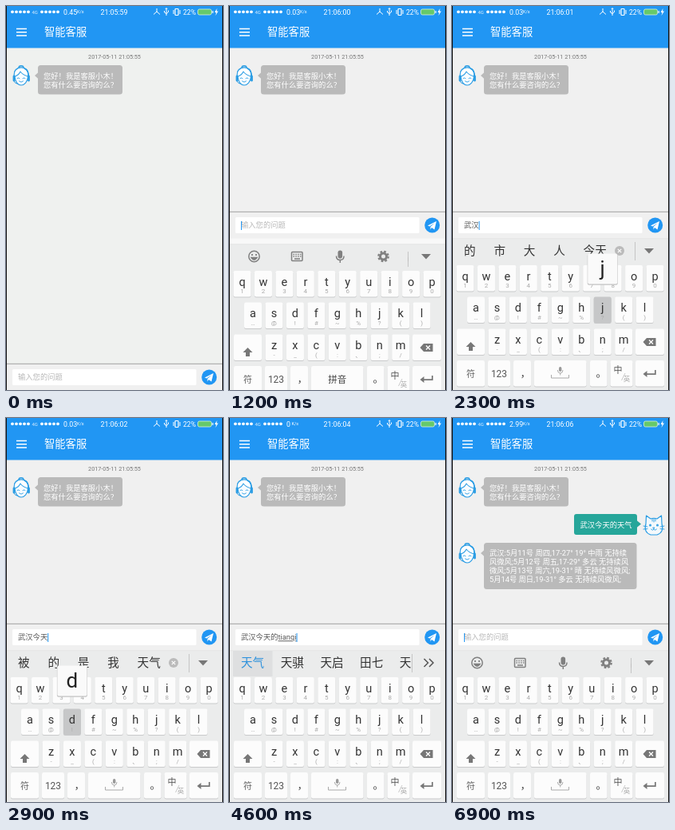
Write an HTML page that moves like this. It is 272x480 px and loops after 7 s.

```html
<!DOCTYPE html>
<html lang="zh">
<head>
<meta charset="utf-8">
<title>智能客服</title>
<style>
  html, body { margin: 0; width: 100%; height: 100%; overflow: hidden; background: #efefef; }
  svg { display: block; width: 100vw; height: 100vh; }
  text { font-family: Roboto, 'Noto Sans CJK SC', 'Noto Sans CJK', sans-serif; white-space: pre; }
  .msg { font-size: 9.3px; fill: #fff; }
  .line { fill: none; stroke: #2b9de4; stroke-linecap: round; stroke-linejoin: round; }
  .grey { fill: none; stroke: #808080; stroke-width: 1.5; }
  .mid { text-anchor: middle; }
</style>
</head>
<body>
<svg id="stage" viewBox="0 0 272 480">
  <defs>
    <g id="agent" class="line">
      <path d="M-8 0C-10-7-6-11 0-11S10-7 8.500 0C8 7 4 11 0 11S-7.500 7-8 0Z" fill="#f8fcff" stroke-width="1.100"/>
      <path d="M-8.500 0C-4-1-2-4-1-6C2-2 5-1 8.500 0C10-8 5-11 0-11S-10-7-8.500 0Z" fill="#fff" stroke-width="1.100"/>
      <path d="M-3-11C-3-14 3-14 3-11M4-10C9-8 10-3 9 4" stroke-width="1.500"/>
      <path d="M-5 2.500Q-3.500 1-2 2.500M2 2.500Q3.500 1 5 2.500M-2.500 6Q0 8.500 2.500 6" stroke-width=".9"/>
      <path d="M-9 0V5M9.500 0V5" stroke-width="2.800"/>
      <path d="M-9 6Q-8 9-4 9.500" stroke-width="1"/>
    </g>
    <g id="cat" class="line" stroke-width="1.200">
      <path d="M-10-2L-9.500-12L-4-8Q0-9.500 4-8L9.500-12L10-2Q13 9 4 12H-4Q-13 9-10-2Z" fill="#f4f9fc"/>
      <path d="M-2-8V-5M0-8.500V-4M2-8V-5M-13 1L-8 2M-13 5L-8 4.500M13 1L8 2M13 5L8 4.500" stroke-width=".9"/>
      <path d="M-3.500 5Q-1.500 7.500 0 5Q1.500 7.500 3.500 5M-1 3H1L0 4.500Z" stroke-width=".9"/>
      <circle cx="-4.500" cy="0" r=".9"/><circle cx="4.500" cy="0" r=".9"/>
    </g>
  </defs>

  <rect id="page" width="272" height="480"/>
  <rect width="272" height="52.500" fill="#2196f3"/>
  <g id="status" fill="#fff" font-size="8.800">
    <text x="32.500" y="9.500" font-size="6" opacity=".85">4G</text>
    <text id="speed" x="72" y="10.500"/>
    <text id="unit" y="9" font-size="5.500">K/s</text>
    <text id="clock" class="mid" x="135.500" y="10.500"/>
    <text x="222" y="10.500" font-size="8.600">22%</text>
    <path d="M189 3V7L185 10.500M189 7L193 10.500M201 3V12M198.500 6V8L201 9.500L203.500 7.500V5.500M199.800 4L201 2.500L202.200 4" fill="none" stroke="#fff"/>
    <rect x="212" y="3.500" width="4" height="8" rx=".7" fill="none" stroke="#fff" stroke-width="1.200"/>
    <path d="M210 5V10M218 5V10" stroke="#fff"/>
    <rect x="240.500" y="4" width="17" height="7" rx="2" fill="#66c96b" stroke="#d8f2d9" stroke-width=".8"/>
    <path d="M258.500 6H259.700V9H258.500ZM264.500 3L261.500 8H263.500L262.500 12L266 6.500H264Z"/>
  </g>
  <path d="M13 28.500H26M13 32.700H26M13 37H26" stroke="#fff" stroke-width="1.400"/>
  <text x="48" y="37.300" font-size="13.300" fill="#fff">智能客服</text>
  <text class="mid" x="136" y="65.700" font-size="7.200" fill="#777">2017-05-11 21:05:55</text>

  <use href="#agent" x="19" y="88"/>
  <path d="M36 87L41 82.500V91.500Z" fill="#bababa"/>
  <rect x="40" y="74" width="106" height="36.500" rx="3.500" fill="#bababa"/>
  <text class="msg" x="47" y="90.700">您好！我是客服小木！</text>
  <text class="msg" x="47" y="101.500">您有什么要咨询的么？</text>

  <g id="question">
    <path d="M237 132.500L231.500 128V137Z" fill="#26a69a"/>
    <rect x="153" y="120" width="79" height="26" rx="3" fill="#26a69a"/>
    <text class="msg" x="160.500" y="136.500">武汉今天的天气</text>
    <use href="#cat" x="253" y="134"/>
  </g>
  <g id="answer">
    <use href="#agent" x="19" y="170"/>
    <path d="M36 169L41 164.500V173.500Z" fill="#bababa"/>
    <rect x="40" y="156" width="191.500" height="58" rx="3.500" fill="#bababa"/>
  </g>

  <g id="bar">
    <rect x="0" y="257" width="272" height="34" fill="#f0f0f0"/>
    <path d="M0 257.300H272" stroke="#999" stroke-width=".9"/>
    <rect x="8" y="264" width="230.500" height="20" rx="1.500" fill="#fff"/>
    <text id="hint" x="15" y="277.300" font-size="9.300" fill="#b8b8b8">输入您的问题</text>
    <text id="typed" x="15" y="277.300" font-size="9.300" fill="#555"><tspan id="done"></tspan><tspan id="pinyin" text-decoration="underline"></tspan></text>
    <rect id="caret" y="269" width="1" height="11" fill="#2196f3"/>
    <circle cx="254.700" cy="274" r="9.500" fill="#2196f3"/>
    <path d="M249 274.500L260 269L257.500 279.500L254 277L252.500 279.500V276L258 271L251.500 275.500Z" fill="#fff"/>
  </g>

  <rect id="gap" y="290.500" width="272" height="190" fill="#f8f8f8"/>
  <g id="board">
    <rect y="290.500" width="272" height="190" fill="#ebecec"/>
    <path d="M0 290.800H272" stroke="#dcdcdc" stroke-width=".6"/>
    <g id="tools">
      <g class="grey">
        <circle cx="31.500" cy="306" r="6.700"/>
        <path d="M28 307.500Q31.500 313 35 307.500Z" fill="#808080"/>
        <path d="M29 303V305M34 303V305" stroke-width="1.800"/>
        <rect x="78.500" y="300.500" width="13.500" height="11" rx="1"/>
        <path d="M80.500 303.500H90.500M80.500 306H90.500" stroke-dasharray="1.500 1.300"/>
        <path d="M82 309H89M134.500 305.500Q134.500 310.500 139.300 310.500T144 305.500M139.300 310.500V314"/>
        <circle cx="193.500" cy="306" r="4" stroke-width="3"/>
        <circle cx="193.500" cy="306" r="6.200" stroke-width="2.200" stroke-dasharray="2.600 2.270"/>
      </g>
      <rect x="136.500" y="298.500" width="5.600" height="10" rx="2.800" fill="#808080"/>
    </g>
    <g id="cands" font-size="14.600">
      <rect id="mark" x="5" y="291" width="49.500" height="32" fill="#dedfe0"/>
    </g>
    <path id="divider" stroke="#bbb" stroke-width=".8"/>
    <path id="fold" d="M241 303H253L247 309.500Z" fill="#777"/>
    <path id="more" d="M244.500 301L249.500 306L244.500 311M251 301L256 306L251 311" fill="none" stroke="#555" stroke-width="1.500"/>
    <g id="clear">
      <circle cx="210" cy="306" r="6" fill="#bbb"/>
      <path d="M207.800 303.800L212.200 308.200M212.200 303.800L207.800 308.200" stroke="#fff" stroke-width="1.200"/>
    </g>
    <g id="keys"></g>
    <g fill="#777">
      <path d="M23.500 421L17.500 427H21V432H26V427H29.500Z" transform="translate(0 -1)"/>
      <path d="M239.500 420L244 415H255.500V425H244Z"/>
      <path d="M247 417.500L252 422.500M252 417.500L247 422.500" stroke="#fff" stroke-width="1.300"/>
      <path d="M239.500 460L244.500 456V459.200H254V455H255.700V460.900H244.500V464Z"/>
    </g>
    <g id="spaceIcon">
      <path d="M124.500 461V465H146.500V461" fill="none" stroke="#aaa"/>
      <rect x="134" y="451" width="3.400" height="6" rx="1.700" fill="#999"/>
      <path d="M132.300 455Q132.500 459 135.700 459T139 455M135.700 459V461.500" fill="none" stroke="#999" stroke-width=".8"/>
    </g>
    <text id="spaceName" class="mid" x="135.700" y="464" font-size="11.500" font-weight="500" fill="#444">拼音</text>
    <g id="popup">
      <rect x="-19" y=".8" width="38" height="38.500" rx="2" fill="#c4c4c4"/>
      <rect x="-18.500" y="0" width="37" height="38" rx="2" fill="#fafafa"/>
      <text id="popLetter" class="mid" y="27.500" font-size="26" fill="#222"/>
    </g>
  </g>
  <path d="M.5 0V480M271.500 0V480" stroke="#111"/>
</svg>
<script>
const LOOP = 7000;
const $ = id => document.getElementById(id);

function add(parent, tag, attrs, text) {
  const el = document.createElementNS('http://www.w3.org/2000/svg', tag);
  for (const k in attrs) el.setAttribute(k, attrs[k]);
  if (text) el.textContent = text;
  parent.appendChild(el);
  return el;
}
const show = (id, on) => { $(id).style.display = on ? '' : 'none'; };

for (let i = 0; i < 5; i++) {
  for (const x of [8, 45]) add($('status'), 'circle', { cx: x + i * 5, cy: 7.3, r: 1.9 });
}
[
  '武汉:5月11号 周四,17-27° 19° 中雨 无持续',
  '风微风;5月12号 周五,17-29° 多云 无持续风',
  '微风;5月13号 周六,19-31° 晴 无持续风微风;',
  '5月14号 周日,19-31° 多云 无持续风微风;'
].forEach((s, i) => add($('answer'), 'text', { class: 'msg', x: 47, y: 171.6 + i * 11 }, s));

// Keyboard
const keys = {};
function cap(x, y, w) {
  add($('keys'), 'rect', { x, y: y + 0.9, width: w, height: 32.5, rx: 2.2, fill: '#c9cacb' });
  return add($('keys'), 'rect', { x, y, width: w, height: 32.5, rx: 2.2, fill: '#fcfcfc' });
}
function label(x, y, size, fill, s) {
  add($('keys'), 'text', { class: 'mid', x, y, 'font-size': size, fill }, s);
}
[
  ['qwertyuiop', '1234567890', 16.5, 324],
  ['asdfghjkl', '…@!#~%?()', 30, 363.5],
  ['zxcvbnm', '-_(:、;/', 56.5, 403.5]
].forEach(([letters, subs, left, y]) => {
  [...letters].forEach((c, i) => {
    const x = left + i * 26.45;
    keys[c] = { x, y, cap: cap(x - 11, y, 22) };
    label(x, y + 18.5, 14.5, '#333', c);
    label(x, y + 28.3, 8, '#aaa', subs[i]);
  });
});
cap(6, 403.5, 35);
cap(230, 403.5, 36);
[[6, 35], [45, 28], [77, 22], [103, 65.5], [173, 21.5], [198.5, 28], [230, 36]].forEach(([x, w]) => cap(x, 443, w));
label(23.5, 463.5, 11, '#666', '符');
label(59, 464, 12, '#555', '123');
label(92, 463, 13, '#444', '，');
label(187, 463, 13, '#444', '。');
label(208, 459, 11, '#555', '中');
label(219, 469, 8.5, '#aaa', '英');
add($('keys'), 'path', { d: 'M212.500 468L217 459', stroke: '#bbb', 'stroke-width': 0.8 });

const words = Array.from({ length: 5 }, () => add($('cands'), 'text', { y: 311.3 }));

// time, committed text, pinyin, candidates, popup key, pressed, first candidate lit
const NEXT = '被 的 是 我 天气';
const WUHAN = '武汉 误会 五号 无话 芜';
const CITY = '的 市 大 人 今天';
const TODAY = '今天 仅 家庭 惊叹 尽';
const OF = '天 人 是 我 天气';
const DE = '的 得 都 到 大';
const TI = '提 题 体 替 踢';
const TIAN = '天 田 填 甜 添';
const TIANQI = '天气 天骐 天启 田七 天';
const AFTER = '预报 很 真 不错 怎样';
const steps = [
  [0, '', '', ''],
  [1400, '', '', '', 'w', 1],
  [1500, '', 'w', '我 为 无 问 玩'],
  [1600, '', 'w', '我 为 无 问 玩', 'u', 1],
  [1700, '', 'wu', '无 五 武 物 屋', 'h', 1],
  [1800, '', 'wuh', WUHAN],
  [2100, '', 'wuh', WUHAN, '', 0, 1],
  [2200, '武汉', '', CITY],
  [2300, '武汉', '', CITY, 'j', 1],
  [2400, '武汉', 'j', '就 级 加 将 今'],
  [2500, '武汉', 'jt', TODAY],
  [2700, '武汉', 'jt', TODAY, '', 0, 1],
  [2800, '武汉今天', '', NEXT],
  [2900, '武汉今天', '', NEXT, 'd', 1],
  [3000, '武汉今天', 'd', DE, 'd', 0],
  [3100, '武汉今天', 'd', DE],
  [3300, '武汉今天', 'd', DE, '', 0, 1],
  [3400, '武汉今天的', '', OF],
  [3500, '武汉今天的', '', OF, 't', 1],
  [3600, '武汉今天的', 't', '他 她 天 太 听'],
  [3700, '武汉今天的', 't', '他 她 天 太 听', 'i', 1],
  [3800, '武汉今天的', 'ti', TI],
  [3900, '武汉今天的', 'tia', TIAN],
  [4000, '武汉今天的', 'tian', TIAN, 'n', 0],
  [4100, '武汉今天的', 'tian', TIAN],
  [4200, '武汉今天的', 'tianq', TIANQI, 'q', 0],
  [4300, '武汉今天的', 'tianqi', TIANQI, 'i', 0],
  [4500, '武汉今天的', 'tianqi', TIANQI],
  [4600, '武汉今天的', 'tianqi', TIANQI, '', 0, 1],
  [4700, '武汉今天的天气', '', AFTER],
  [4900, '', '', AFTER],
  [5200, '', '', '']
];
const speeds = [[0, '0.45'], [700, '0.03'], [3500, '0'], [5900, '2.99']];
const at = (list, t) => list.filter(s => s[0] <= t).pop();

function drawInput(t, done, pinyin) {
  const empty = !done && !pinyin;
  show('hint', empty);
  $('done').textContent = done;
  $('pinyin').textContent = pinyin;
  const width = empty ? 0 : $('typed').getComputedTextLength();
  $('caret').setAttribute('x', 15 + width);
  show('caret', t >= 700 && (t < 4900 || Math.floor((t - 400) / 500) % 2 === 1));
}

function drawCandidates(pinyin, cands, lit) {
  const composing = !!pinyin, list = cands.split(' ');
  show('tools', !cands);
  show('cands', cands);
  show('mark', lit);
  show('more', composing);
  show('fold', !composing);
  show('clear', cands && !composing);
  words.forEach((w, i) => {
    w.textContent = list[i] || '';
    w.setAttribute('x', 15 + i * (composing ? 49.7 : 37.4));
    w.setAttribute('fill', composing && i === 0 ? '#2f92dc' : '#333');
  });
  $('divider').setAttribute('d', cands ? 'M229.500 295V318' : 'M224.500 307V319M224.500 300V312');
}

function drawPress(key, pressed) {
  for (const c in keys) keys[c].cap.setAttribute('fill', c === key && pressed ? '#c6c7c8' : '#fcfcfc');
  show('popup', key);
  if (!key) return;
  const { x, y } = keys[key];
  $('popup').setAttribute('transform', `translate(${Math.max(24, x)} ${y - 54})`);
  $('popLetter').textContent = key;
}

function draw(ms) {
  const t = Math.floor(ms / 100) * 100;
  const [, done, pinyin, cands, key, pressed, lit] = at(steps, t);
  const open = t >= 900;

  $('page').setAttribute('fill', t < 100 ? '#eff1ef' : '#f0f0f0');
  const sec = Math.floor((t + 500) / 1000);
  $('clock').textContent = sec ? '21:06:0' + (sec - 1) : '21:05:59';
  const speed = at(speeds, t)[1];
  $('speed').textContent = speed;
  $('unit').setAttribute('x', speed === '0' ? 78.5 : 89);

  show('question', t >= 4900);
  show('answer', t >= 5700);
  $('bar').setAttribute('transform', `translate(0 ${open ? 0 : 190})`);
  show('gap', open);
  show('board', open);
  const rest = 1 - Math.min(1, Math.max(0, (t - 800) / 600));
  $('board').setAttribute('transform', `translate(0 ${190 * rest ** 3})`);
  show('spaceName', t < 1400);
  show('spaceIcon', t >= 1400);

  drawInput(t, done, pinyin);
  drawCandidates(pinyin, cands, lit);
  drawPress(key, pressed);
}

const start = performance.now();
function tick() {
  draw((performance.now() - start) % LOOP);
  requestAnimationFrame(tick);
}
tick();
</script>
</body>
</html>
```
